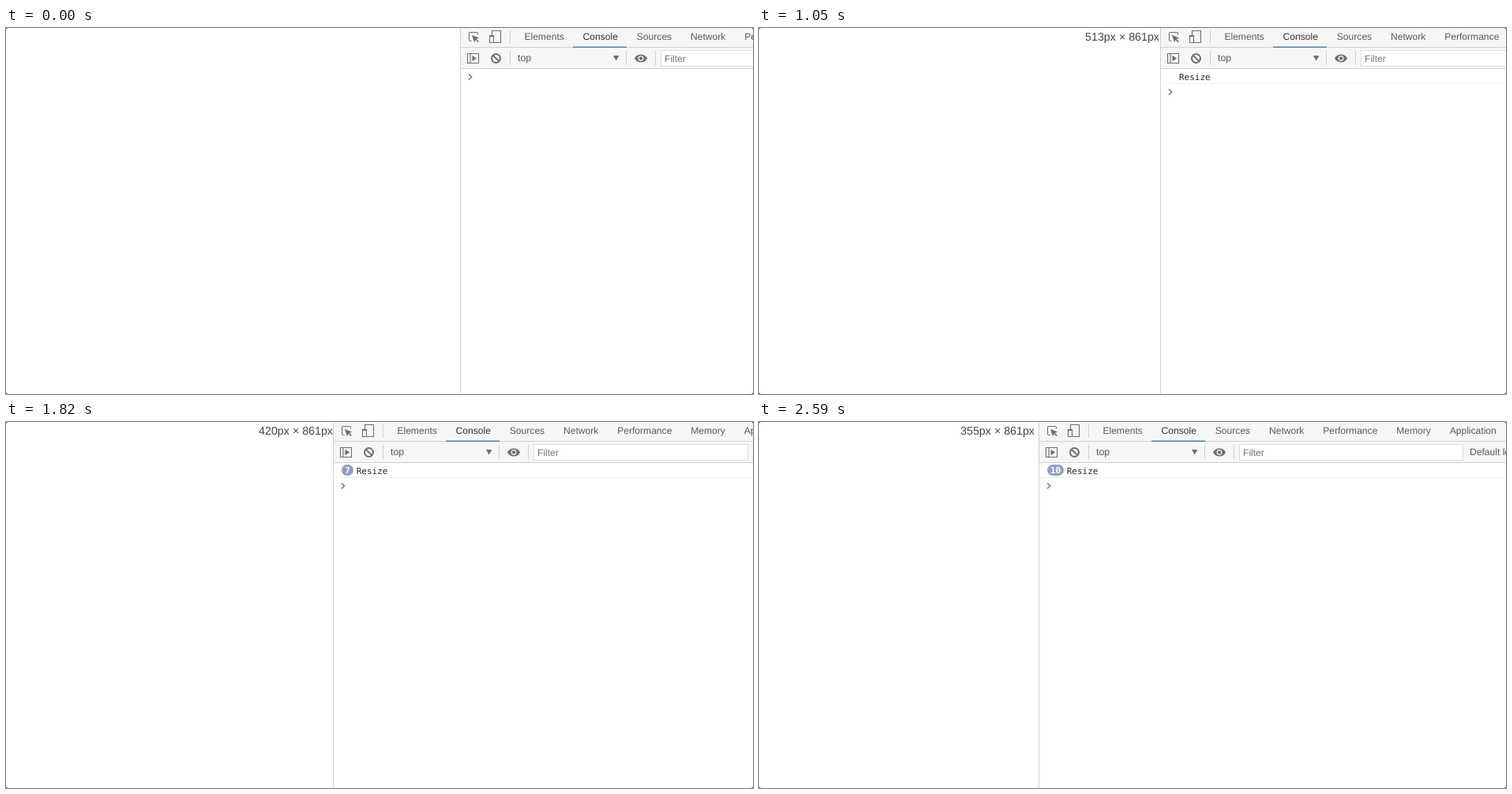
Recreate the animation shown at these times as an HTML page. Size 946 by 464 pixels, loop 3290 ms.

```html
<!DOCTYPE html>
<html lang="en">
<head>
<meta charset="utf-8">
<title>Resize counter</title>
<style>
  html, body { margin: 0; width: 100%; height: 100%; overflow: hidden; background: #fff; }
  svg { display: block; width: 946px; height: 464px; fill: #5a5a5a; text-rendering: geometricPrecision;
        font: 12.1px "Liberation Sans", Arial, sans-serif; }
  #size { font-size: 14.25px; fill: #444; text-anchor: end; }
  .log { font: 11px "DejaVu Sans Mono", monospace; fill: #2a2a2a; }
  #count { font-weight: bold; fill: #fff; text-anchor: middle; }
  .line { fill: none; stroke: #6e6e6e; stroke-width: 1.1; }
  .icon { fill: #6e6e6e; }
</style>
</head>
<body>
<svg viewBox="0 0 946 464">
  <text id="size" y="16"></text>
  <g id="panel">
    <path fill="#fff" d="M0 0h700v464H0z"/>
    <path fill="#f6f6f6" d="M0 0h700v51H0z"/>
    <path fill="#d0d0d0" d="M0 0h1v464H0zM0 24h700v1H0zM0 51h700v1H0zM63 3h1v17h-1zM63 29h1v18h-1zM210 29h1v18h-1zM247 29h1v18h-1z"/>
    <path fill="#4a80b8" d="M143 23.5h68v1.5h-68z"/>
    <text id="tabs" x="81.4" y="15"></text>

    <path class="line" d="M14.5 16.5h-1.5q-1.5 0-1.5-1.5v-8q0-1.5 1.5-1.5h8q1.5 0 1.5 1.5v1.5"/>
    <path class="icon" d="M15 9l9 3.4-3.3 1.5 3.1 3.1-1.2 1.2-3.1-3.1-1.5 3.2z"/>
    <path class="line" d="M40.5 9V3.5h11v15H43M37.5 9.5h5v9h-5zM37.5 10.5h5"/>

    <path class="line" d="M9.5 32.5h14v12h-14zM13 32.5v12"/>
    <path class="icon" d="M15.5 34.8l5.5 3.7-5.5 3.7zM194 35h7.4l-3.7 6.5z"/>
    <path class="line" style="stroke-width: 2" d="M40 38.5a5.5 5.5 0 1 0 11 0a5.5 5.5 0 1 0-11 0M41.7 34.6l7.8 7.8"/>
    <path class="icon" d="M221 38.5c3-6.8 13-6.8 16 0c-3 6.8-13 6.8-16 0"/>
    <circle cx="229" cy="38.5" r="2.8" fill="#6e6e6e" stroke="#f6f6f6" stroke-width="1.3"/>
    <text x="73" y="42" font-size="12.4">top</text>
    <rect id="filter" x="254.5" y="28.5" height="20" fill="#fff" stroke="#ddd"/>
    <text x="259" y="43" fill="#757575">Filter</text>
    <text id="levels" y="42">Default levels</text>

    <g id="message">
      <path fill="#f0f0f0" d="M0 70h700v1H0z"/>
      <rect id="badge" x="11" y="54" height="14" rx="7" fill="#909fbe"/>
      <text id="count" class="log" y="65"></text>
      <text id="word" class="log" y="66">Resize</text>
    </g>
    <path id="prompt" fill="none" stroke="#5577a0" stroke-width="1.4" d="M11 -3.5l3.7 3.5-3.7 3.5"/>
  </g>
  <path fill="#777" d="M0 0h2l-2 2zM946 0h-2l2 2zM0 464h2l-2-2zM946 464h-2l2-2z"/>
</svg>
<script>
const LOOP = 3290, STEP = 70, START = 560, LAG = 26;
// Each pull of the divider: from, until, where it ends
const PULLS = [
  [490, 840, 543], [840, 1210, 482], [1260, 1540, 453.5],
  [1610, 1960, 389], [2235, 2310, 367], [2310, 2520, 354.5]
];
const clamp = (value, max) => Math.min(max, Math.max(0, value));
const edgeAt = t => PULLS.reduce(
  (x, [from, until, end]) => x + (end - x) * clamp((t - from) / (until - from), 1), 575);
// Throttled events logged during one stretch of dragging
const events = (t, from, max) => clamp(Math.floor((t - from) / 140), max);

const $ = id => document.getElementById(id);
const set = (id, attrs) => {
  for (const name in attrs) $(id).setAttribute(name, attrs[name]);
};

$('tabs').innerHTML = ['Elements', 'Console', 'Sources', 'Network', 'Performance', 'Memory', 'Application']
  .map((name, i) => `<tspan dx="${i ? 23.8 : 0}"${name === 'Console' ? ' fill="#333"' : ''}>${name}</tspan>`)
  .join('');

function draw() {
  const t = Math.floor(performance.now() % LOOP / STEP) * STEP;
  const edge = t < START ? 575 : Math.floor(edgeAt(t));
  const width = Math.round(edgeAt(t - LAG));
  const count = events(t, 840, 8) + events(t, 2240, 2);
  const badge = count > 9 ? 21 : 15;
  const filter = Math.round(277 + 0.2 * (389 - edge));

  set('panel', { transform: `translate(${edge} 0)` });
  set('size', { x: width - 6, visibility: t < START ? 'hidden' : 'visible' });
  $('size').textContent = `${width}px × 861px`;
  set('filter', { width: filter - 1 });
  set('levels', { x: 262 + filter });

  set('message', { display: count ? 'inline' : 'none' });
  set('badge', { width: count > 1 ? badge : 0 });
  set('count', { x: 11 + badge / 2 });
  $('count').textContent = count > 1 ? count : '';
  set('word', { x: count > 1 ? badge + 14.7 : 24 });
  set('prompt', { transform: `translate(0 ${count ? 81 : 62})` });
  requestAnimationFrame(draw);
}
draw();
</script>
</body>
</html>
```
